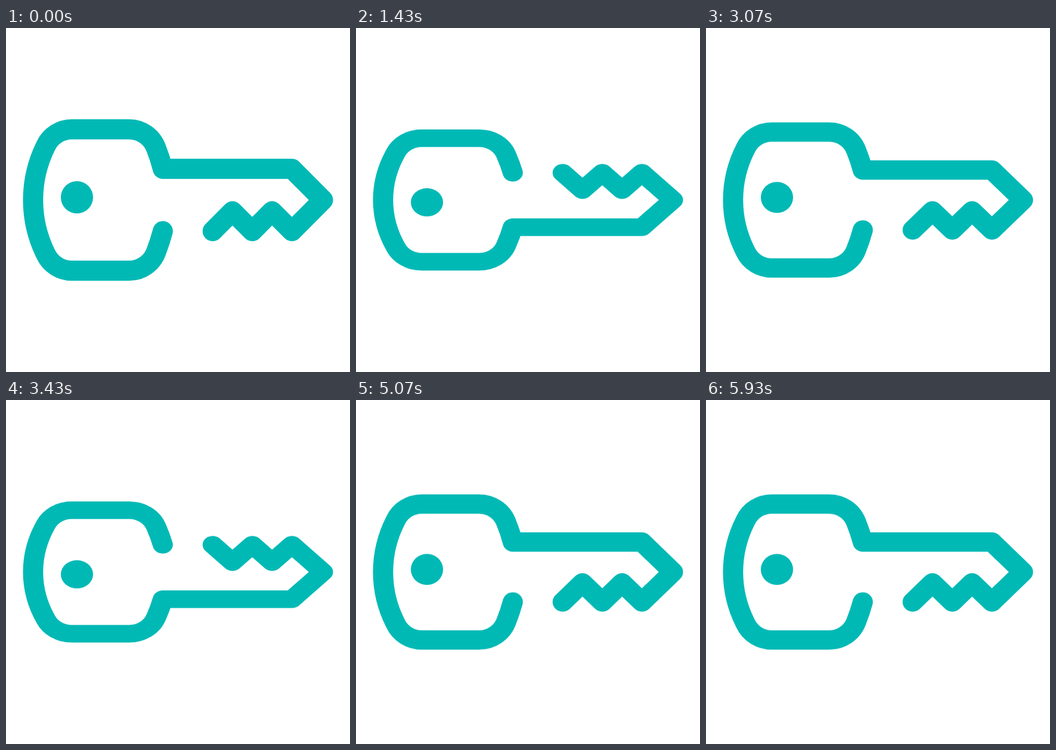
An HTML page for the animation above (6 s loop, 640 by 640 pixels).

```html
<!DOCTYPE html>
<html lang="en">
<head>
<meta charset="utf-8">
<title>Turning key</title>
<style>
  html, body { margin: 0; width: 100%; height: 100%; overflow: hidden; background: #fff; }
  svg { display: block; width: 100vw; height: 100vh; }
  #key { transform-origin: 320px 320px; }
  .line { fill: none; stroke: #00b9b5; stroke-width: 37.5; stroke-linecap: round; stroke-linejoin: round; }
  .hole { fill: #00b9b5; }
</style>
</head>
<body>
<svg viewBox="0 0 640 640">
  <g id="key">
    <path class="line" d="M291.7 378 Q286.5 398 279.3 416.3 A53.5 53.5 0 0 1 229 451.5
      H122.5 A53.5 53.5 0 0 1 73.7 420 A226 226 0 0 1 73.7 220 A53.5 53.5 0 0 1 122.5 188.5
      H229 A53.5 53.5 0 0 1 279.3 223.7 Q286.5 242 291.7 262
      H532 L589.7 320 L532 378 L495 341 L458.3 378 L421.3 341 L384.5 378"/>
    <circle class="hole" cx="132" cy="315" r="30"/>
  </g>
</svg>
<script>
  const FPS = 14, PERIOD = 2000;
  const START = 1033, MID = 1500, END = 1967;

  const ease = (t, from, to) => {
    const p = Math.min(1, Math.max(0, (t - from) / (to - from)));
    return p * p * (3 - 2 * p);
  };
  const scaleAt = t => 1 - 2 * ease(t, START, MID) + 2 * ease(t, MID, END);

  // One held pose per step, with step times rounded to 10 ms
  const count = FPS * PERIOD / 1000;
  const steps = Array.from({ length: count + 1 }, (_, i) => {
    const t = i * 1000 / FPS;
    return {
      offset: Math.round(t / 10) * 10 / PERIOD,
      transform: `scaleY(${scaleAt(t).toFixed(4)})`,
      easing: 'steps(1, end)'
    };
  });

  document.getElementById('key').animate(steps, { duration: PERIOD, iterations: Infinity });
</script>
</body>
</html>
```
